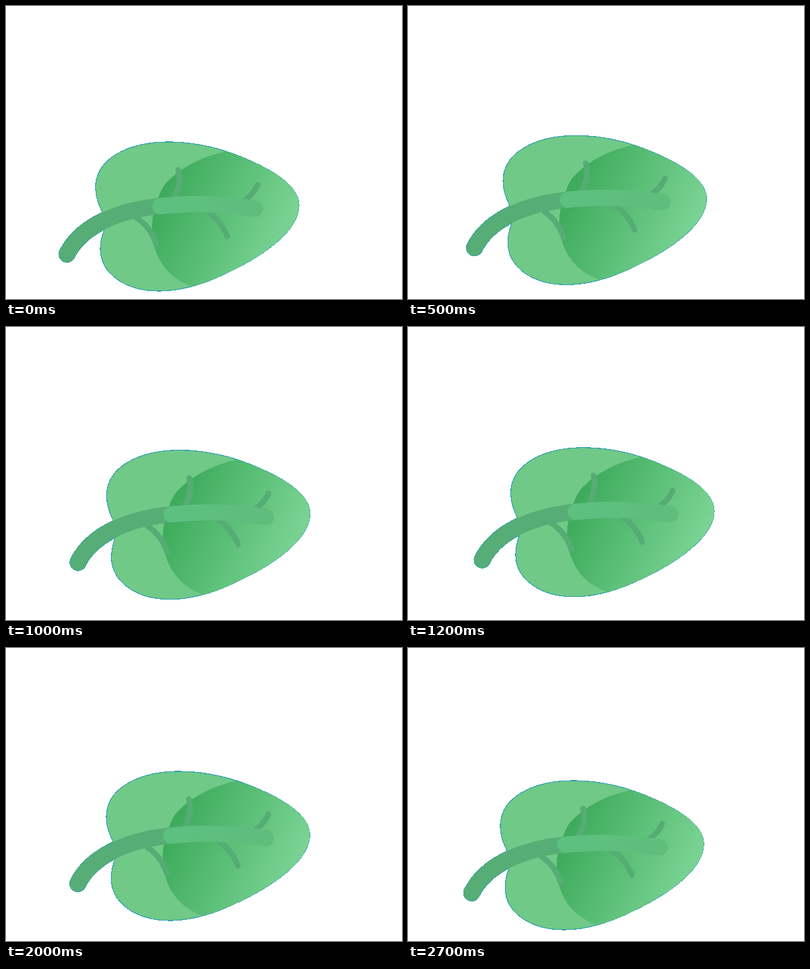
An HTML page for the animation above (2800 ms loop, 600 px wide and 444 px high).

```html
<!DOCTYPE html>
<html lang="en">
<head>
<meta charset="utf-8">
<title>Leaf</title>
<style>
  html, body { margin: 0; width: 100%; height: 100%; overflow: hidden; background: #fff; }
  svg { display: block; width: 100%; height: 100%; }
  .line { fill: none; stroke-linecap: round; stroke-linejoin: round; }
  .rim { stroke: #2f9fb0; shape-rendering: crispEdges; }
</style>
</head>
<body>
<svg viewBox="0 0 600 444">
  <defs>
    <path id="blade" d="M153 328 C143 306 135.700 294 135.700 275 C135.700 232 184 206 246 206
      C289 206 333 217.500 370 234.300 C410 252 444 274 444 302 C444 337 399 374 337 403.500
      C304 420 268 432 232 432 C180 432 143 405 143 368 C143 355 146 345 153 328 Z"/>
    <path id="shade" d="M337 220 C300 226 263 245 241 270 C233 281 231 290 228 299
      C223 313 221 325 221 337 C221 372 239 411 283 425 L460 440 L460 220 Z"/>
    <path id="stem" d="M92.500 376 C112 336.500 162 312.500 222 304.500 C275 298 325 299 377 307"/>
    <clipPath id="inBlade"><use href="#blade"/></clipPath>
    <linearGradient id="tone" gradientUnits="userSpaceOnUse" x1="238" y1="288" x2="430" y2="372">
      <stop offset="0" stop-color="#3dab5b"/>
      <stop offset="1" stop-color="#7fd698"/>
    </linearGradient>
    <linearGradient id="glow" gradientUnits="userSpaceOnUse" x1="222" y1="0" x2="390" y2="0">
      <stop offset="0" stop-color="#5cc080"/>
      <stop offset="1" stop-color="#60bd7c"/>
    </linearGradient>
  </defs>
  <g id="leaf">
    <use href="#stem" class="line rim" stroke-width="26"/>
    <use href="#blade" class="rim" fill="#70c986" stroke-width="1.200"/>
    <g clip-path="url(#inBlade)"><use href="#shade" fill="url(#tone)"/></g>
    <path class="line" stroke="#55ad75" stroke-width="8.500" d="M261 248 Q267 268 254 292
      M381 271 Q376 284 362 294 M335 349 Q325 324 303 310 M198 321 Q220 336 227.500 361"/>
    <use href="#stem" class="line" stroke="#56ad76" stroke-width="24.500"/>
    <path class="line" stroke="url(#glow)" stroke-width="24.500" d="M234 303.200 C283 298 329 299.500 377 307"/>
  </g>
</svg>
<script>
  const LOOP = 2800, STEP = 100;
  // Drift as [time, x, y]; the loop restarts with a small jump.
  const KEYS = [[0, 0, 0], [1500, 25, -29], [2800, 2.4, -3]];
  const leaf = document.getElementById('leaf');

  function drift(t) {
    const [a, b] = t < KEYS[1][0] ? [KEYS[0], KEYS[1]] : [KEYS[1], KEYS[2]];
    const k = (t - a[0]) / (b[0] - a[0]);
    return [1, 2].map(i => a[i] + (b[i] - a[i]) * k);
  }

  const start = performance.now();
  function draw(now) {
    const t = Math.max(0, now - start) % LOOP;
    const [x, y] = drift(Math.floor(t / STEP) * STEP);
    leaf.setAttribute('transform', `translate(${x} ${y})`);
    requestAnimationFrame(draw);
  }
  draw(start);
</script>
</body>
</html>
```
